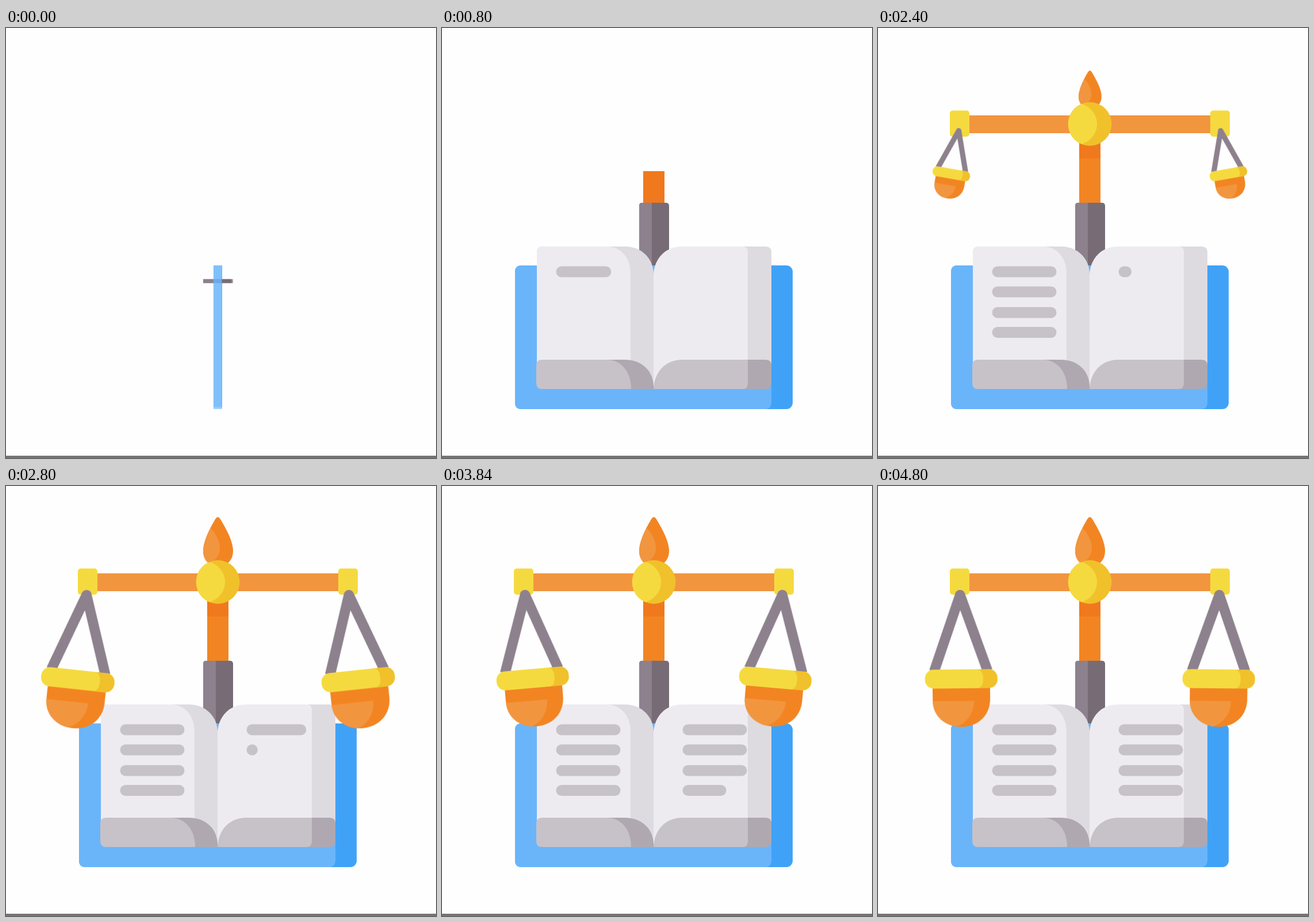
These frames come from a looping animation (748 px wide and 748 px high, 4.88 s). An HTML page:

```html
<!DOCTYPE html>
<html lang="en">
<head>
<meta charset="utf-8">
<title>Law book and scales</title>
<style>
  html, body { margin: 0; width: 100%; height: 100%; overflow: hidden; background: #fefefe; }
  svg { display: block; width: 100vw; height: 100vh; }

  .soft { filter: blur(.7px); }
  .light { fill: #f2953f; }
  .orange { fill: #f28522; }
  .gold { fill: #f5da3f; }
  .amber { fill: #f0c12b; }
  .page { fill: #eeebf0; }
  .shade { fill: #dddbe0; }
  .edge { fill: #c7c2c8; }
  .dark { fill: #afa8b0; }
  .string { fill: none; stroke: #8d818e; stroke-width: 17.5; stroke-linejoin: round; }

  .move { animation: 4880ms linear infinite; }
  .cover { animation-name: cover; transform-origin: 368.5px 540px; }
  .pages { animation-name: pages; transform-origin: 368.5px 540px; }
  .post { animation-name: post; transform-origin: 368.5px 444px; }
  .pole { animation-name: pole; }
  .ball { animation-name: ball; transform-origin: 368.5px 167px; }
  .beam { animation-name: beam; transform-origin: 368.5px 167px; }
  .flame { animation-name: flame; transform-origin: 368.5px 140px; }
  .pan { animation-name: pop, swing; transform-origin: 142.5px 167px; }

  @keyframes cover {
    0% { transform: scaleX(.029); opacity: .85; }
    8.2%, 100% { transform: none; opacity: 1; }
  }
  @keyframes pages {
    0%, 1.64% { transform: scaleX(0); }
    9%, 100% { transform: none; }
  }
  @keyframes post {
    0% { transform: scaleY(.05); }
    9.8%, 100% { transform: none; }
  }
  @keyframes pole {
    0%, 12.1% { transform: translateY(152px); }
    22.95%, 100% { transform: none; }
  }
  @keyframes ball {
    0%, 23.4% { transform: scale(0); }
    29.1%, 100% { transform: none; }
  }
  @keyframes beam {
    0%, 29.5% { transform: scaleX(0); }
    39.34% { transform: scaleX(.711); }
    43.85%, 100% { transform: scaleX(1); }
  }
  @keyframes flame {
    0%, 42.6% { transform: scale(0); }
    45.9% { transform: scale(.38); }
    51.2%, 100% { transform: scale(1); }
  }
  @keyframes pop {
    0%, 46.7% { scale: 0; }
    51.64% { scale: 1.03; }
    63%, 100% { scale: 1; }
  }
  @keyframes swing {
    0%, 51.64% { rotate: calc(10deg * var(--side)); }
    57.38% { rotate: calc(6.1deg * var(--side)); }
    70.49% { rotate: calc(.1deg * var(--side)); }
    78.69% { rotate: calc(-5deg * var(--side)); animation-timing-function: ease-out; }
    81.97% { rotate: calc(-5.7deg * var(--side)); animation-timing-function: ease-in-out; }
    91.8% { rotate: calc(-2deg * var(--side)); animation-timing-function: ease-out; }
    98.36%, 100% { rotate: calc(-.6deg * var(--side)); }
  }
</style>
</head>
<body>
<svg viewBox="0 0 748 748">
  <defs>
    <clipPath id="abovePost"><path d="M340 100h60v206h-60z"/></clipPath>
    <g id="scalePan">
      <path class="string" d="M96 322 142.5 189.500 189 322"/>
      <path class="orange" d="M93 346H193V370C193 400 171 419 143 419S93 400 93 370z"/>
      <path class="light" d="M93 374H165C164 395 153 412 134 418.500C110 415 93 397 93 374z"/>
      <rect class="gold" x="80" y="319" width="126" height="33" rx="15"/>
      <path class="amber" d="M173 319H191A15 15 0 0 1 206 334V337A15 15 0 0 1 191 352H173Q181 349 181 337V334Q181 322 173 319z"/>
    </g>
  </defs>

  <rect y="744" width="748" height="4" fill="#767475"/>

  <g class="soft">
    <g clip-path="url(#abovePost)">
      <g class="move pole">
        <path class="orange" d="M350 157h37v170h-37z"/>
        <path fill="#f0791d" d="M350 157h37v70h-37z"/>
      </g>
    </g>

    <g class="move post">
      <rect x="343" y="304" width="52" height="140" rx="5" fill="#776c76"/>
      <path fill="#8d818e" d="M348 304H365V444H348Q343 444 343 439V309Q343 304 348 304z"/>
    </g>

    <g class="move cover">
      <rect x="127" y="413" width="483" height="250" rx="11" fill="#40a2f7"/>
      <path fill="#6ab5fa" d="M138 413H573V650Q573 663 562 663H138Q127 663 127 652V424Q127 413 138 413z"/>
    </g>

    <g class="move pages">
      <path class="shade" d="M175 380H318C348 380 368 402 368 428V624H300L165 590V390Q165 380 175 380z"/>
      <path class="page" d="M175 380H288C312 381 328 400 328 428V600H165V390Q165 380 175 380z"/>
      <path class="dark" d="M288 577H318C348 577 368 597 368 624V628H300z"/>
      <path class="edge" d="M174 577H288C312 578 329 598 329 628H174Q164 628 164 618V587Q164 577 174 577z"/>

      <path class="shade" d="M525 380H563Q573 380 573 390V600H525z"/>
      <path class="page" d="M368 624V428C370 401 388 380 418 380H523Q532 380 532 390V600H380z"/>
      <path class="dark" d="M520 577H563Q573 577 573 587V618Q573 628 563 628H520z"/>
      <path class="edge" d="M368 628C369 598 389 577 418 577H532V618Q532 628 523 628z"/>
      <g id="text"></g>
    </g>

    <g class="move flame">
      <path class="orange" d="M364.500 57Q368.500 51 372.500 57C381 71 395 95 395 113C395 130 383 140 369 140S343 130 343 113C343 95 356 71 364.500 57z"/>
      <path class="light" d="M356 73C365 83 372 95 372 108C372 121 363 131 352 134C346 129 343 122 343 113C343 101 349 86 356 73z"/>
    </g>

    <g class="move beam">
      <path class="light" d="M150 152h437v31h-437z"/>
      <rect class="gold" x="125" y="143.500" width="34" height="45.500" rx="5"/>
      <rect class="gold" x="578" y="143.500" width="34" height="45.500" rx="5"/>
    </g>

    <g class="move ball">
      <circle class="amber" cx="368.500" cy="167" r="38"/>
      <path class="gold" d="M354 132A38 38 0 0 0 354 202C370 197 381 183 381 167S370 137 354 132z"/>
    </g>

    <g class="move pan" style="--side:1"><use href="#scalePan"/></g>
    <g transform="translate(451.500)">
      <g class="move pan" style="--side:-1"><use href="#scalePan"/></g>
    </g>
  </g>
</svg>
<script>
  const LOOP = 4880, GROW = 585;
  const text = document.getElementById('text');
  const rows = [424, 459, 495, 529.5];

  // Each text line starts as a dot and grows to the right.
  function addLine(x, y, start) {
    const line = document.createElementNS('http://www.w3.org/2000/svg', 'rect');
    const attrs = { x, y: y - 9.5, height: 19, rx: 9.5, width: 0, fill: '#c7c2c8' };
    for (const key in attrs) line.setAttribute(key, attrs[key]);
    text.append(line);
    const at = start / LOOP;
    line.animate([
      { width: '0px', offset: 0 },
      { width: '0px', offset: at },
      { width: '19px', offset: at, easing: 'cubic-bezier(.333,.667,.667,1)' },
      { width: '112px', offset: at + GROW / LOOP },
      { width: '112px', offset: 1 }
    ], { duration: LOOP, iterations: Infinity });
  }

  rows.forEach((y, i) => {
    addLine(198.5, y, 460 + 379 * i);
    addLine(418.5, y, 2390 + 410 * i);
  });
</script>
</body>
</html>
```
